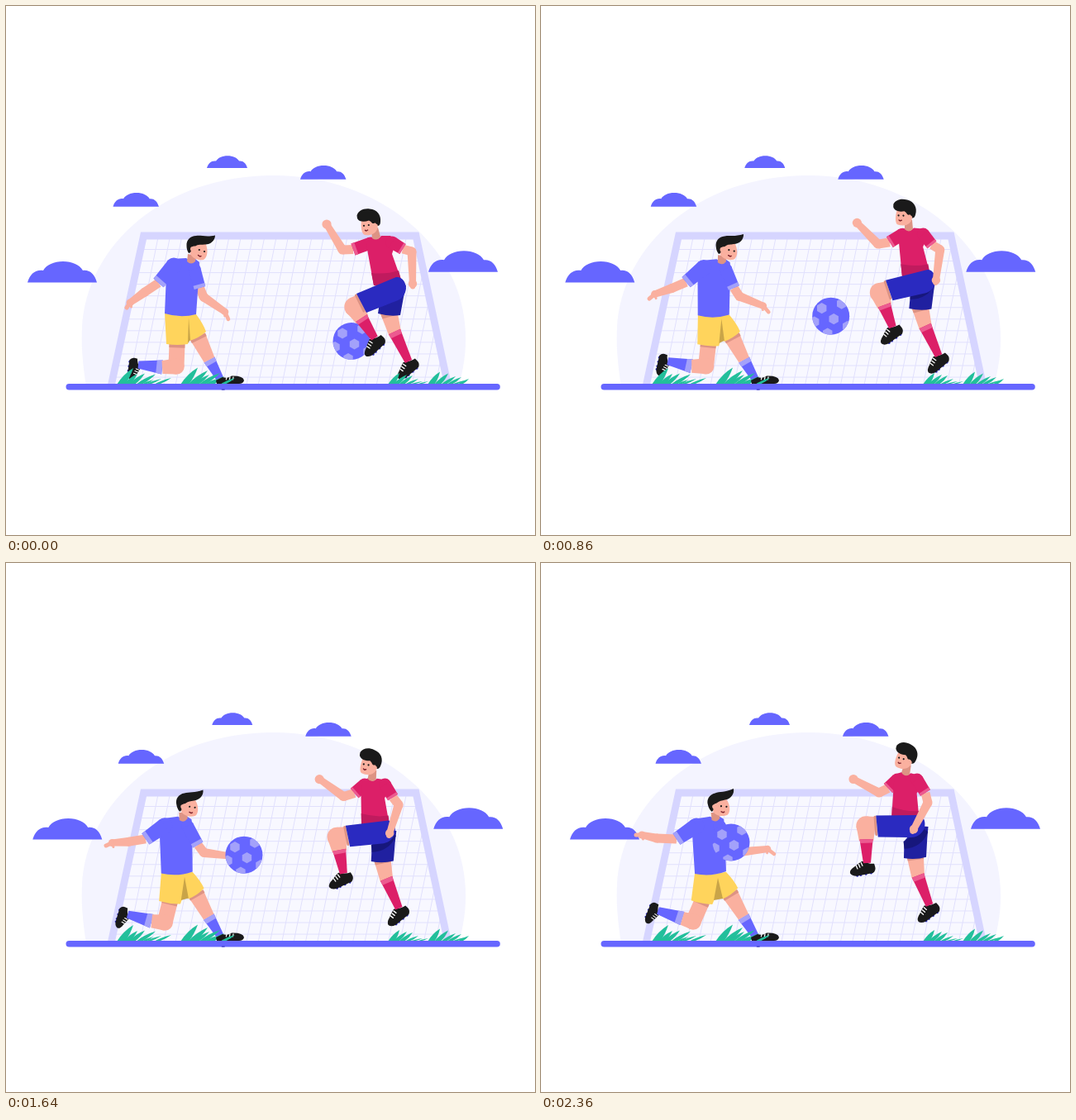
Recreate the animation shown at these times as an HTML page with a canvas. Size 640x640 px, loop 2.43 s.

```html
<!DOCTYPE html>
<html lang="en">
<head>
<meta charset="utf-8">
<title>Football match</title>
<style>
html, body { margin: 0; width: 100%; height: 100%; overflow: hidden; background: #fff; }
canvas { display: block; width: 100vw; height: 100vh; }
</style>
</head>
<body>
<canvas id="stage"></canvas>
<script>
const LOOP = 2430, LAST = 33, MID = 16, STEP = 1000 / 14;
const VIOLET = '#6666ff', PALE = '#a3a1fa', SKIN = '#fab09f', SHADE = '#dd9384', INK = '#1a1a1a';
const PINK = '#dc1f68', ROSE = '#ec5a90', NAVY = '#2a2ac0', DEEP = '#2020a0', GOLD = '#ffd45c', GREEN = '#22bf9b';

// Joints: x, y at the start, the middle and the end of the loop
const RED = {
  neck: [449, 280, 445, 267, 442, 255], head: [439, 255, 441, 241, 443, 227],
  waist: [462, 332, 452, 320, 442, 305],
  shoulderL: [441, 287, 436, 273, 431, 262], cuffL: [420, 294.5, 422, 283, 420, 272.5],
  elbowL: [407, 295, 408, 286, 409, 278], handL: [388, 264, 381, 262, 378, 261.5],
  shoulderR: [467, 286, 461, 273, 455, 262], cuffR: [480, 294, 471, 287, 465, 278],
  elbowR: [491, 297, 480, 294, 468, 290], handR: [492, 336, 473, 330, 451, 322],
  hipF: [472, 342, 463, 330, 452, 318], hemF: [430, 360, 416, 340, 404, 319],
  kneeF: [421, 364, 406, 341, 393, 318], ankleF: [446, 402, 419, 384, 394.5, 363],
  toeF: [437, 420, 406, 401, 374.5, 375],
  hipB: [468, 345, 460, 336, 453.5, 328], hemB: [464, 373, 458, 364, 453, 356],
  sockB: [470, 394, 463, 385, 456, 378],
  ankleB: [487, 430, 479, 421, 470, 414], toeB: [477, 447, 468, 440, 458, 432]
};
const BLUE = {
  neck: [224, 307, 217, 308, 211, 308], head: [233, 290, 224.5, 289, 216.5, 288],
  waist: [211, 373, 208, 375, 205, 376],
  shoulderL: [203, 314, 195, 317, 188, 318], cuffL: [184.5, 335, 173, 334, 164, 334],
  elbowL: [168, 346, 155, 340, 140, 333], handL: [150, 359, 134, 345, 122, 329],
  tipL: [146, 365, 127, 350, 115, 329],
  shoulderR: [228, 318, 222, 318, 216, 318], cuffR: [234.5, 341, 233, 341, 231, 341],
  elbowR: [239, 352, 240, 351, 238, 350], handR: [265, 370, 270, 360, 274, 346],
  tipR: [269, 379, 277, 367, 282, 352],
  hemL: [207, 409, 201, 409, 195, 409], hemR: [232, 400, 230.5, 400, 228.5, 400],
  fold: [221, 377, 217.5, 379, 214, 381], foldL: [220, 408, 214, 408, 209, 408],
  foldR: [223, 404, 221.5, 405, 220, 406],
  kneeB: [206, 436, 197, 435.5, 184, 434], sockB: [189, 437, 180, 435, 171, 430],
  ankleB: [160, 434, 151, 428, 141.5, 420.5], toeB: [152, 449, 139.5, 445, 128.5, 435]
  , kneeF: [246, 428, 245.5, 428, 245, 428], ankleF: [259, 451, 259, 451, 259, 451]
};
const BALL = [418, 405.5, 328, 366.5, 230, 338];

const canvas = document.getElementById('stage');
const ctx = canvas.getContext('2d');
const ratio = window.devicePixelRatio || 1;
canvas.width = canvas.height = 640 * ratio;

const mix = (p, q, t) => [p[0] + (q[0] - p[0]) * t, p[1] + (q[1] - p[1]) * t];
const angle = (p, q) => Math.atan2(q[1] - p[1], q[0] - p[0]);

// Quadratic through the three given places
function place(v, k) {
  const a = (k - MID) * (k - LAST) / (MID * LAST);
  const b = k * (k - LAST) / (MID * (MID - LAST));
  const c = k * (k - MID) / (LAST * (LAST - MID));
  return [v[0] * a + v[2] * b + v[4] * c, v[1] * a + v[3] * b + v[5] * c];
}
function pose(rig, k) {
  const out = {};
  for (const name in rig) out[name] = place(rig[name], k);
  return out;
}

function shape(color, d) {
  ctx.fillStyle = color;
  ctx.fill(new Path2D(d));
}
function disc(color, [x, y], r) {
  ctx.fillStyle = color;
  ctx.beginPath();
  ctx.arc(x, y, r, 0, 7);
  ctx.fill();
}
function poly(color, pts) {
  ctx.fillStyle = color;
  ctx.beginPath();
  pts.forEach(p => ctx.lineTo(p[0], p[1]));
  ctx.closePath();
  ctx.fill();
}
function line(color, w, pts) {
  ctx.strokeStyle = color;
  ctx.lineWidth = w;
  ctx.lineCap = ctx.lineJoin = 'round';
  ctx.beginPath();
  pts.forEach(p => ctx.lineTo(p[0], p[1]));
  ctx.stroke();
}
// Tapered piece of the limb p-q, from share s to share e
function taper(color, p, q, wp, wq, s = 0, e = 1) {
  const t = angle(p, q), nx = -Math.sin(t) / 2, ny = Math.cos(t) / 2;
  const a = mix(p, q, s), b = mix(p, q, e);
  const wa = wp + (wq - wp) * s, wb = wp + (wq - wp) * e;
  poly(color, [[a[0] + nx * wa, a[1] + ny * wa], [b[0] + nx * wb, b[1] + ny * wb],
    [b[0] - nx * wb, b[1] - ny * wb], [a[0] - nx * wa, a[1] - ny * wa]]);
}
// Shapes drawn in the starting pose follow the bone a-b
function bind(rig, now, a, b, draw) {
  const turn = angle(now[a], now[b]) - angle(rig[a], rig[b]);
  ctx.save();
  ctx.translate(...now[a]);
  ctx.rotate(turn);
  ctx.translate(-rig[a][0], -rig[a][1]);
  draw();
  ctx.restore();
}

function sleeve(color, band, p, q, wp, wq) {
  disc(color, p, wp / 2);
  taper(color, p, q, wp, wq);
  taper(band, p, q, wp, wq, 0.82, 1);
}
function arm(cuff, elbow, hand, w, wrist, palm) {
  taper(SKIN, cuff, elbow, w, w);
  disc(SKIN, elbow, w / 2);
  taper(SKIN, elbow, hand, w, wrist);
  disc(SKIN, hand, palm);
}
function shoe(ankle, toe, size, flip) {
  ctx.save();
  ctx.translate(...ankle);
  ctx.rotate(angle(ankle, toe));
  ctx.scale(size, size * flip);
  for (const x of [2, 8, 14, 18]) disc(NAVY, [x, -13.5 + x * 0.36], 1.5);
  shape(INK, 'M4,5 Q10,5 15,4 Q23,4 24,0 Q24,-4 19,-7 L0,-14 Q-5,-13 -6,-9 L-7,-5 Q-2,-3 4,5Z');
  for (const x of [6, 9.5, 13]) line('#fff', 1.3, [[x, 4], [x + 0.5, 0]]);
  ctx.restore();
}

function cloud(x, y, size) {
  ctx.save();
  ctx.translate(x, y);
  ctx.scale(size, size);
  shape(VIOLET, 'M0,25.5 C3,15 10,9.5 19,11 C23,4 32,0 43,0 C54,0 63,4 67,11 C75,10 81,15 84,25.5Z');
  ctx.restore();
}
function goal() {
  ctx.save();
  ctx.clip(new Path2D('M167,278 H496 L534,458 H128Z'));
  ctx.fillStyle = '#f8f8ff';
  ctx.fillRect(120, 270, 430, 190);
  ctx.strokeStyle = '#e1e0fd';
  ctx.lineWidth = 1;
  ctx.beginPath();
  for (let y = 294.5; y < 457; y += 14.05) {
    ctx.moveTo(120, y);
    ctx.lineTo(545, y);
  }
  for (let x = 184; x < 580; x += 14.3) {
    ctx.moveTo(x, 280);
    ctx.lineTo(x - 36, 458);
  }
  ctx.stroke();
  ctx.restore();
  shape('#d6d5ff', 'M163,273.5 H499.5 L539,458 H530 L492.5,282.5 H170 L132,458 H123Z');
}
// Each blade: foot, tip and height of the tip
function tuft(x, blades) {
  for (const [foot, tip, y] of blades) {
    const a = x + foot, b = x + tip, h = 458 - y, w = 3 + h * 0.34;
    shape(GREEN, `M${a},458 Q${a + (b - a) * 0.4},${y + h * 0.36} ${b},${y} Q${(a + w + b) / 2 + 1.5},${y + h * 0.56} ${a + w},458Z`);
  }
}
function grass() {
  tuft(134, [[0, 20, 438], [8, 25, 445], [14, 34, 444.5], [23, 47, 445.5], [30, 44, 452], [34, 54, 451], [45, 66, 450]]);
  tuft(211, [[0, 21, 437.5], [9, 33, 441], [15, 35, 446], [22, 48, 444], [29, 44, 451], [34, 53, 448], [42, 58, 452]]);
  tuft(462, [[0, 14, 444], [6, 23, 446], [13, 30, 447], [20, 37, 451], [26, 42, 454], [34, 49, 454]]);
  tuft(510, [[0, 15, 442.5], [8, 25, 444.5], [16, 34, 448], [23, 41, 449], [29, 45, 453], [36, 50, 451]]);
}
function ball([x, y]) {
  ctx.save();
  ctx.translate(x, y);
  disc(VIOLET, [0, 0], 22.5);
  ctx.beginPath();
  ctx.arc(0, 0, 22.5, 0, 7);
  ctx.clip();
  for (const [hx, hy] of [[-11, -9.5], [3.5, 3.5], [13, -15], [-20, 7], [20, 12.5], [-4, 21]]) {
    poly(PALE, Array.from({ length: 6 }, (_, i) =>
      [hx + 6.6 * Math.sin(i * Math.PI / 3), hy - 6.6 * Math.cos(i * Math.PI / 3)]));
  }
  ctx.restore();
}

function bluePlayer(k) {
  const j = pose(BLUE, k);
  // kneeling leg
  shoe(j.ankleB, j.toeB, 0.86, -1);
  taper(VIOLET, j.sockB, j.ankleB, 17, 9);
  taper(PALE, j.sockB, j.ankleB, 17, 9, 0, 0.24);
  taper(SKIN, j.kneeB, j.sockB, 19, 16);
  taper(SKIN, j.hemL, j.kneeB, 19, 19);
  taper(SHADE, j.hemL, j.kneeB, 19, 19, 0, 0.16);
  disc(SKIN, j.kneeB, 9.8);
  // standing leg
  taper(VIOLET, j.kneeF, j.ankleF, 14.5, 9);
  taper(PALE, j.kneeF, j.ankleF, 14.5, 9, 0, 0.22);
  taper(SKIN, j.hemR, j.kneeF, 20, 14);
  taper(SHADE, j.hemR, j.kneeF, 20, 19, 0, 0.13);
  bind(BLUE, j, 'waist', 'hemL', () =>
    shape(GOLD, 'M192,371 Q211,377 226,374 L222,400 L220,409 Q207,411 194,409Z'));
  bind(BLUE, j, 'waist', 'hemR', () =>
    shape(GOLD, 'M207,374 L230,373 Q239,385 242,394 Q233,402 222,405 L214,385Z'));
  poly('#c9a448', [j.fold, j.foldL, j.foldR]);
  // arms and shirt
  arm(j.cuffL, j.elbowL, j.handL, 11, 8, 4.5);
  line(SKIN, 5, [j.handL, j.tipL]);
  line(SKIN, 3, [j.handL, [j.handL[0] + 1.5, j.handL[1] + 5]]);
  arm(j.cuffR, j.elbowR, j.handR, 11, 8, 4.3);
  line(SKIN, 4.5, [j.handR, j.tipR]);
  line(SKIN, 2.6, [j.handR, [j.handR[0] - 0.5, j.handR[1] + 5]]);
  bind(BLUE, j, 'neck', 'waist', () =>
    shape(VIOLET, 'M200,306 L218,305 Q224,311 229,306 L234,310 L232,345 L230,373 Q211,378 192,372 L194,325Z'));
  sleeve(VIOLET, PALE, j.shoulderL, j.cuffL, 19, 16);
  sleeve(VIOLET, PALE, j.shoulderR, j.cuffR, 15, 14);
  bind(BLUE, j, 'neck', 'head', () => {
    shape(SHADE, 'M220,300 L230,302 L229,309 Q224,314 219,309Z');
    shape(SKIN, 'M222,289 L241,286 C245,295 244,304 239,307 C233,308 226,306 223,300Z');
    shape(INK, 'M218.5,290 C218,283 223,278 230,278 C236,277 242,280 253,277.5 C253,284 247,289 240,288.5 ' +
      'C236,289 233,288 230,290 C229,291 227,290 226,291 C224.5,294 224,299 221,299 C219,296 218.5,293 218.5,290Z');
    disc(SKIN, [226, 294], 3);
    disc(INK, [233.8, 295], 1.1);
    disc(INK, [240, 297], 1.1);
    line('#7a1f2b', 1.4, [[232.5, 301.5], [234.5, 303], [236, 302.6]]);
  });
}

function redPlayer(k) {
  const j = pose(RED, k);
  arm(j.cuffL, j.elbowL, j.handL, 11, 8, 5.6);
  // standing leg
  shoe(j.ankleB, j.toeB, 1, 1);
  taper(SKIN, j.hemB, j.sockB, 20, 16, -0.2, 1.1);
  taper(SHADE, j.hemB, j.sockB, 20, 16, -0.2, 0.14);
  taper(PINK, j.sockB, j.ankleB, 15.5, 9);
  taper(ROSE, j.sockB, j.ankleB, 15.5, 9, 0, 0.14);
  bind(RED, j, 'hipB', 'hemB', () => {
    shape(DEEP, 'M453,352 L450,372 Q464,376 477,374 L481,352 L484,338 L470,335Z');
    shape('#17177c', 'M452,361 Q473,362 483,344 L478,340 L452,352Z');
  });
  // raised leg
  shoe(j.ankleF, j.toeF, 1, 1);
  taper(SKIN, j.kneeF, j.ankleF, 23, 9, 0, 0.4);
  taper(PINK, j.kneeF, j.ankleF, 20, 9, 0.36, 1);
  taper(ROSE, j.kneeF, j.ankleF, 20, 9, 0.36, 0.46);
  taper(SKIN, j.hemF, j.kneeF, 24, 23);
  disc(SKIN, j.kneeF, 11.7);
  // shirt and head
  sleeve(PINK, ROSE, j.shoulderL, j.cuffL, 15, 15);
  bind(RED, j, 'neck', 'waist', () => {
    shape(PINK, 'M439,282 L444,279 Q449,285 454,278 L465,278 L472,284 L467,300 L478,331 Q462,341 445,338 L438,300 L436,288Z');
    shape('#c01b5e', 'M442,323 Q460,325 475,320 L478,331 Q462,341 445,338Z');
  });
  bind(RED, j, 'neck', 'head', () => {
    shape(SHADE, 'M442,272 L450,268 L453,279 Q449,285 443,281Z');
    shape(SKIN, 'M430,259 C429,266 430,276 434,277 C440,278 447,276 449,270 L450,255 L432,254Z');
    shape(INK, 'M424.5,253.5 C426,248 432,244.5 440,245.5 C449,246 454,253 453,261 C453,265 451,266.5 449,266 ' +
      'L447,262.5 C445,262.5 444,264.5 441.5,261 L439,259.5 C433,262 427,261 425,257Z');
    disc(SKIN, [447.2, 266], 2.6);
    disc(INK, [433, 265.8], 1.1);
    disc(INK, [438.8, 265], 1.1);
    line('#7a1f2b', 1.4, [[434.5, 271.3], [436, 272], [437.6, 271]]);
  });
  bind(RED, j, 'hipF', 'hemF', () => {
    line(SHADE, 3, [[423.5, 350], [433, 369]]);
    shape(NAVY, 'M424,348 L472,328 C479,327 484,334 484,342 C483,350 478,355 472,357 L436,371Z');
  });
  arm(j.cuffR, j.elbowR, j.handR, 11, 8, 5.2);
  line(SKIN, 6, [j.handR, mix(j.elbowR, j.handR, 1.09)]);
  sleeve(PINK, ROSE, j.shoulderR, j.cuffR, 15, 14);
}

function draw(k) {
  ctx.setTransform(ratio, 0, 0, ratio, 0, 0);
  ctx.fillStyle = '#fff';
  ctx.fillRect(0, 0, 640, 640);
  shape('#f4f4ff', 'M97,460 C92,430 91,405 92,390 C97,290 190,205 324,205 C450,205 553,290 556,395 C557,420 553,440 548,460Z');
  goal();
  const drift = 9 * k / LAST;
  for (const [x, y, size] of [[26, 309, 1], [129.5, 226, 0.66], [243, 181.2, 0.583], [356, 193, 0.66], [511, 296.3, 1]]) {
    cloud(x + drift, y, size);
  }
  bluePlayer(k);
  ball(place(BALL, k));
  redPlayer(k);
  grass();
  shape(INK, 'M254,453 L262,449 Q268,451 273,447.5 Q287,447 288,453 Q287,457 282,457 L255,457Z');
  for (const x of [267, 271, 275]) line('#fff', 1.2, [[x, 448.8], [x - 0.6, 452]]);
  tuft(255, [[4, 22, 450]]);
  line(VIOLET, 7.6, [[76.3, 460.8], [594, 460.8]]);
  line('#4a48d0', 1.6, [[261.5, 464], [264, 464]]);
}

function tick() {
  const t = performance.now() % LOOP;
  draw(Math.min(LAST, Math.floor((Math.floor(t / 10) * 10 + 5) / STEP)));
  requestAnimationFrame(tick);
}
tick();
</script>
</body>
</html>
```
